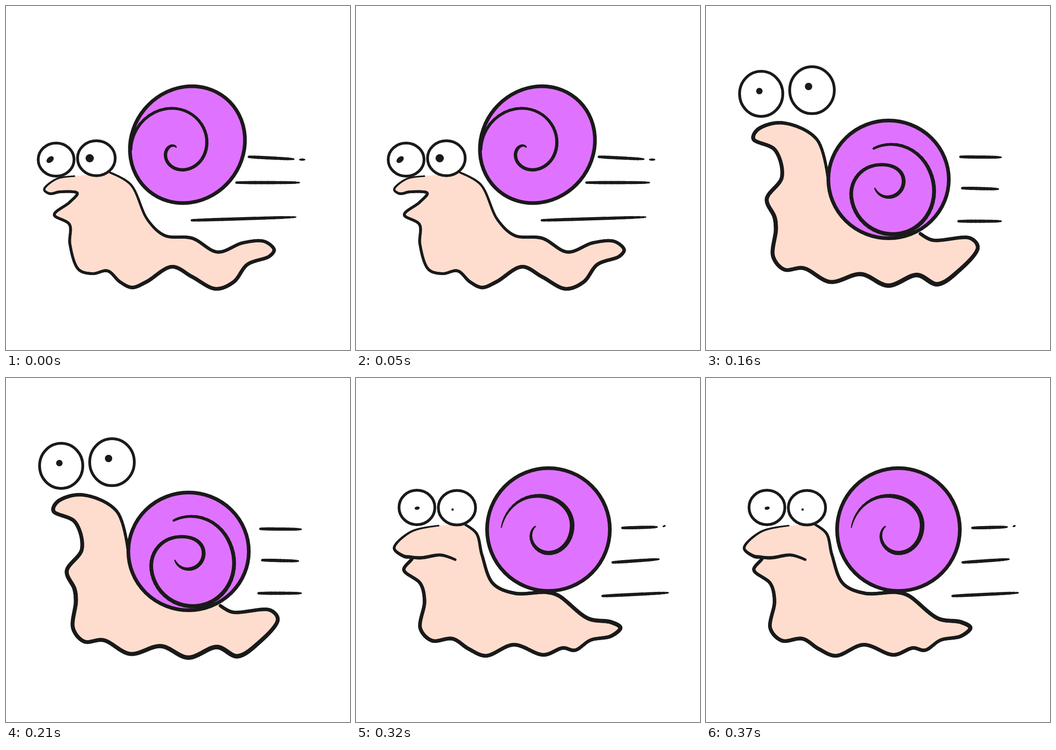
Write an HTML page with a canvas that moves like this. It is 748 px wide and 748 px high and loops after 400 ms.

```html
<!DOCTYPE html>
<html lang="en">
<head>
<meta charset="utf-8">
<title>Racing snail</title>
<style>
  html, body { margin: 0; width: 100%; height: 100%; overflow: hidden; background: #fff; }
  canvas { display: block; }
</style>
</head>
<body>
<canvas id="stage" width="748" height="748"></canvas>
<script>
const ctx = document.getElementById('stage').getContext('2d');
const INK = '#1a1a1a', SKIN = '#ffddce', SHELL = '#df73ff';
const STEP_MS = 80, SAMPLES = 14;
ctx.lineCap = ctx.lineJoin = 'round';

const parse = text => text.split(' ').map(p => p.split(',').map(Number));
const gap = (p, q) => Math.sqrt(Math.hypot(q[0] - p[0], q[1] - p[1])) || 1;

// Samples a centripetal Catmull-Rom curve through the key points.
function spline(pts) {
  const out = [pts[0]];
  for (let k = 0; k < pts.length - 1; k++) {
    const b = pts[k], c = pts[k + 1], a = pts[k - 1] || b, d = pts[k + 2] || c;
    const ab = gap(a, b), bc = gap(b, c), cd = gap(c, d);
    for (let i = 1; i <= SAMPLES; i++) {
      const t = i / SAMPLES;
      out.push([0, 1].map(j => {
        const step = c[j] - b[j];
        const m = step + bc * ((b[j] - a[j]) / ab - (c[j] - a[j]) / (ab + bc));
        const n = step + bc * ((d[j] - c[j]) / cd - (d[j] - b[j]) / (bc + cd));
        return b[j] + t * (m + t * (3 * step - 2 * m - n + t * (m + n - 2 * step)));
      }));
    }
  }
  return out;
}

function trace(curve) {
  ctx.beginPath();
  curve.forEach(p => ctx.lineTo(...p));
}

// Pen stroke whose width runs evenly through the given widths.
function ink(curve, ...widths) {
  const last = curve.length - 1;
  ctx.strokeStyle = INK;
  for (let i = 0; i < last; i++) {
    const u = i / last * (widths.length - 1), k = Math.floor(u);
    ctx.lineWidth = widths[k] + ((widths[k + 1] ?? widths[k]) - widths[k]) * (u - k);
    trace([curve[i], curve[i + 1]]);
    ctx.stroke();
  }
}

function body(keys, ...widths) {
  const curve = spline(parse(keys));
  trace(curve);
  ctx.fillStyle = SKIN;
  ctx.fill();
  ink(curve, ...widths);
}

// Inward spiral; radii are given at every quarter turn.
function spiral(x, y, start, radii, ...widths) {
  const polar = spline(radii.map((r, i) => [start + 90 * i, r]));
  ink(polar.map(([deg, r]) => {
    const a = deg * Math.PI / 180;
    return [x + r * Math.cos(a), y + r * Math.sin(a)];
  }), ...widths);
}

function oval(fill, width, x, y, rx, ry = rx, tilt = 0) {
  ctx.beginPath();
  ctx.ellipse(x, y, rx, ry, tilt, 0, 2 * Math.PI);
  ctx.fillStyle = fill;
  ctx.fill();
  if (!width) return;
  ctx.strokeStyle = INK;
  ctx.lineWidth = width;
  ctx.stroke();
}

const line = (keys, ...widths) => ink(spline(parse(keys)), ...widths);
const shell = (...shape) => oval(SHELL, 8, ...shape);
const eye = (...shape) => oval('#fff', 6, ...shape);
const dot = (...shape) => oval(INK, 0, ...shape);
const dash = keys => line(keys, 5, 7, 7, 6, 1.5);

const poses = [
  () => {
    body('149,370 110,376 83,399 95,408 118,404 155,407 138,427 105,454 138,475 139,518 158,573 188,582 221,576 248,600 274,612 305,600 361,567 405,589 456,615 495,600 525,562 573,544 583,530 562,512 515,515 460,535 405,505 345,499 308,465 271,388 226,362',
      3, 6, 6, 6, 8, 8, 7, 7, 4);
    shell(394.5, 301.5, 131, 121, -.88);
    spiral(370, 312, 180, [99, 89, 65, 42, 20, 5], 7, 6, 7, 7, 7, 2);
    eye(109, 334, 39, 36);
    dot(96, 334, 9, 6, -.7);
    eye(196.5, 331, 41, 38);
    dot(182, 331, 9);
    dash('528,328 626,333');
    dot(644, 334, 7, 2.5);
    dash('501,384 638,384');
    dash('404,466 630,459');
  },
  () => {
    body('262,388 240,341 166,314 110,325 98,350 145,382 149,420 115,444 112,462 148,474 151,510 146,572 178,596 258,574 303,596 340,610 412,577 455,597 485,610 512,595 548,553 599,526 575,507 540,507 490,519 455,512',
      8, 7, 8, 8, 8, 8, 5);
    line('262,380 265,430 272,478', 8, 7, 2);
    shell(399, 393.5, 135, 131.5);
    spiral(395, 415, 180, [111, 86, 70, 65, 40, 17, 12, 7], 2, 6, 8, 8, 9, 9, 8, 2);
    eye(118, 259, 39, 40);
    dot(113, 254, 5);
    eye(207, 249, 41);
    dot(199, 247, 5.5);
    dash('519,291 640,288');
    dash('556,377 629,375');
    dash('552,451 632,446');
    dot(646, 444, 6, 2.5, -.2);
  },
  () => {
    body('268,396 241,290 165,254 112,269 103,289 150,313 165,372 132,420 149,459 152,485 146,545 170,573 212,570 270,600 337,583 396,608 459,585 503,605 548,577 591,525 575,505 492,509 466,495',
      6, 8, 8, 9, 8, 9, 10, 8, 7);
    shell(397, 377, 131, 128);
    spiral(395, 385, 248, [81, 94, 114, 85, 43, 36, 31, 30], 5, 8, 9, 8, 7, 8, 8, 2);
    eye(120, 191, 47, 49);
    dot(116, 185, 7);
    eye(230.5, 183, 48.5, 51);
    dot(223, 175, 8);
    dash('553,328 642,329');
    dash('557,396 636,398');
    dash('549,468 642,468');
  },
  () => {
    body('258,380 225,327 162,311 110,330 112,360 154,381 151,422 115,444 115,464 158,469 162,500 150,550 165,592 198,604 270,572 312,601 340,614 410,580 455,597 488,606 517,589 547,553 585,549 590,533 560,511 475,524 449,513',
      8, 8, 8, 9, 9, 9, 5);
    line('284,308 270,333 259,372', 1, 6);
    shell(389.5, 389, 133, 128);
    spiral(394, 411, 188, [108, 87, 79, 73, 40, 18, 12, 6], 2, 7, 9, 9, 8, 8, 7, 2);
    eye(117.5, 264, 40.5, 39);
    dot(113, 256, 6.5);
    eye(217, 255, 38.5);
    dot(208, 251, 6);
    dash('555,356 633,355');
    dash('558,420 630,423');
    dash('551,481 655,482');
  },
  () => {
    body('180,321 120,334 83,370 105,388 122,391 104,417 140,447 149,485 140,545 165,571 210,567 245,589 282,604 343,580 408,602 450,587 476,592 510,570 555,561 575,543 555,531 505,523 440,473 415,466 345,468 298,447 274,385 262,338 238,319',
      3, 7, 7, 8, 8, 8, 7, 9, 8, 7, 5);
    line('105,388 140,391 185,385 216,395', 7, 7, 5);
    shell(418.5, 329.5, 133.5);
    spiral(410, 322, 178, [94, 65, 60, 58, 20], 2, 9, 10, 9, 2);
    eye(132.5, 281.5, 39, 37.5);
    dot(133, 283, 5.5, 3.5, -.2);
    eye(219.5, 282, 40.5, 37.5);
    dot(210, 286, 2.5);
    dash('579,326 655,324');
    dot(670, 322, 3.5, 2, -.4);
    dash('558,401 659,394');
    dash('536,474 679,467');
  }
];

function draw() {
  ctx.clearRect(0, 0, 748, 748);
  poses[Math.floor(performance.now() / STEP_MS) % poses.length]();
  requestAnimationFrame(draw);
}
draw();
</script>
</body>
</html>
```
